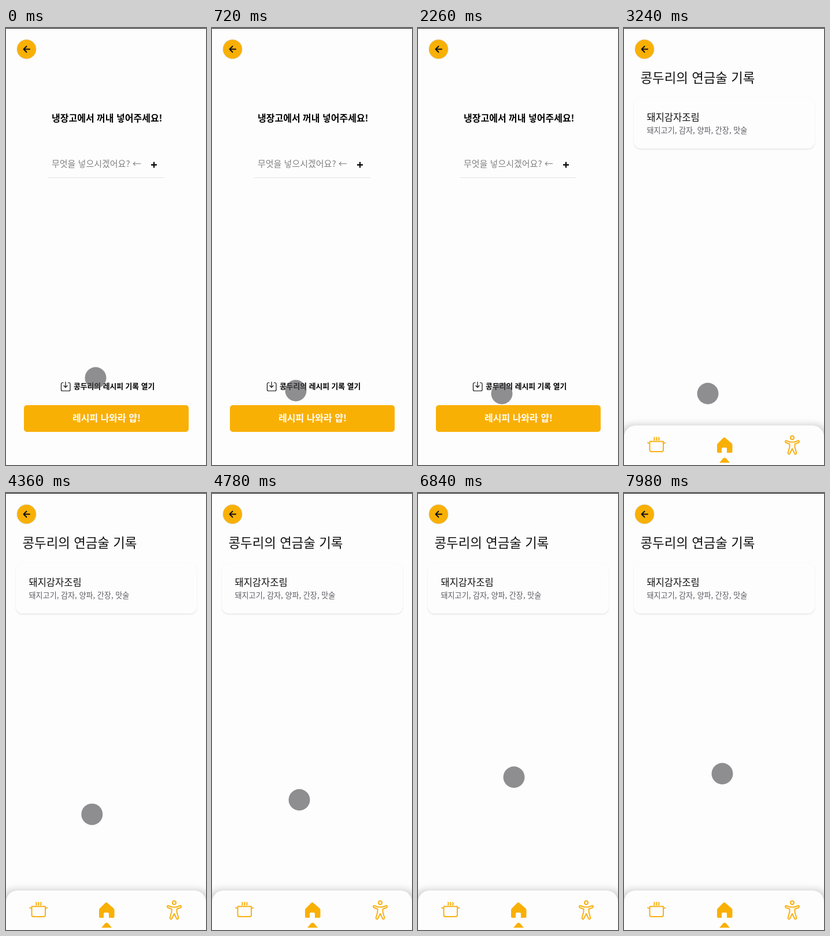
Write an HTML page that moves like this. It is 346 px wide and 752 px high and loops after 8 s.

```html
<!DOCTYPE html>
<html lang="ko">
<head>
<meta charset="utf-8">
<title>레시피 기록</title>
<style>
  html, body { margin: 0; width: 100%; height: 100%; overflow: hidden; background: #fdfdfd; }
  svg { display: block; width: 100vw; height: 100vh; }
  text { font-family: "Noto Sans CJK KR", "Noto Sans CJK", "Noto Sans CJK JP", sans-serif; }
  .bold { font-weight: 700; }
  .light { font-weight: 300; }
  .line { fill: none; stroke: #f9b115; stroke-width: 2; stroke-linecap: round; stroke-linejoin: round; }
  .solid { fill: #f9b005; }
  .ink { fill: none; stroke: #111; }
</style>
</head>
<body>
<svg viewBox="0 0 346 752">
  <defs>
    <filter id="soft" x="-20%" y="-40%" width="140%" height="180%"><feGaussianBlur stdDeviation="6"/></filter>
    <filter id="faint" x="-10%" y="-20%" width="120%" height="140%"><feGaussianBlur stdDeviation="1"/></filter>
  </defs>
  <rect width="346" height="752" fill="#fdfdfd"/>

  <g id="fridge">
    <text class="bold" x="79" y="160.5" font-size="16">냉장고에서 꺼내 넣어주세요!</text>
    <text class="light" x="79" y="239" font-size="15" fill="#808080">무엇을 넣으시겠어요? ←</text>
    <path class="ink" stroke-width="2.4" d="M251 235.5h10M256 230.5v10"/>
    <path d="M73 257.5H274" stroke="#e0e0e0"/>
    <path class="ink" stroke-width="1.2" stroke-linecap="round" stroke-linejoin="round"
      d="M99 610.5h-1.5q-2 0-2 2v10q0 2 2 2h11.5q2 0 2-2v-10q0-2-2-2H107.5M103 609v9.5m-3-3 3 3 3-3"/>
    <text class="bold" x="117" y="620.5" font-size="12.8">콩두리의 레시피 기록 열기</text>
    <rect class="solid" x="31" y="649" width="285" height="46" rx="5"/>
    <text class="bold" x="115" y="676.5" font-size="16" fill="#fdfdfd">레시피 나와라 얍!</text>
  </g>

  <g id="records">
    <text x="28.5" y="94" font-size="22.4" fill="#111">콩두리의 연금술 기록</text>
    <rect x="17" y="122" width="313" height="87" rx="12" fill="#e4e4e6" filter="url(#faint)"/>
    <rect x="17" y="121" width="313" height="86.5" rx="12" fill="#fdfdfd"/>
    <text x="39.5" y="160" font-size="16.5" fill="#111">돼지감자조림</text>
    <text class="light" x="39.5" y="181" font-size="13.1" fill="#5c5c64">돼지고기, 감자, 양파, 간장, 맛술</text>

    <rect x="-6" y="682" width="358" height="90" rx="20" fill="#d2d2d4" filter="url(#soft)"/>
    <rect y="684" width="346" height="90" rx="20" fill="#fdfdfd"/>
    <path class="line" d="M44.5 711.5h23.5v14.5q0 3-3 3h-17.500q-3 0-3-3zM44.500 715.500l-3.500-2M68 715.500l3.500-2M52 704.500q1.500 2 0 4.500M56 704.500q1.500 2 0 4.500M60 704.500q1.500 2 0 4.500"/>
    <path class="solid" d="M173.500 704.500q1 0 2 1l10.500 9q1.500 1.500 1.500 3V729q0 2-2 2H178v-7q0-2-2-2h-5q-2 0-2 2v7h-6q-2 0-2-2V717.500q0-1.500 1.500-3l9-9q1-1 2-1z"/>
    <path class="solid" d="M165 748l6.500-7.500q2.500-2 5 0L183 748z"/>
    <circle class="line" cx="291" cy="705" r="3"/>
    <path class="line" d="M280 710l7.500 2.500h7l7.500-2.500q2 2 0 3.500l-6.500 2.500v5l3 10.500q-1 2.500-3 1.500l-4.500-9-4.500 9q-2 1-3-1.500l3-10.500v-5L280 713.500q-2-1.500 0-3.500z"/>
  </g>

  <path d="M0 .5H346" stroke="#111"/>
  <circle cx="35.5" cy="36.5" r="17" fill="#dcd5c2"/>
  <circle class="solid" cx="35.5" cy="36.5" r="16.3"/>
  <path class="ink" stroke-width="2" stroke-linecap="round" stroke-linejoin="round" d="M41 36.5H30.5m5-5-5 5 5 5"/>
  <circle id="touch" r="18.5" fill="#4f4d51" fill-opacity=".63"/>
</svg>
<script>
  const LOOP = 8000, PAGE_SWITCH = 2860;
  // time, x, y of the finger
  const path = [
    [0, 155, 602], [720, 145, 624], [2260, 145, 629], [3240, 145, 629],
    [4780, 151, 528], [6840, 166, 489], [7980, 170, 483]
  ];
  const byId = id => document.getElementById(id);
  const fridge = byId("fridge"), records = byId("records"), touch = byId("touch");

  const slope = (i, axis) => (path[i + 1][axis] - path[i][axis]) / (path[i + 1][0] - path[i][0]);

  // Harmonic tangents keep the curve smooth without overshoot.
  function tangent(i, axis) {
    if (i === 0) return slope(0, axis);
    if (i === path.length - 1) return slope(i - 1, axis);
    const a = slope(i - 1, axis), b = slope(i, axis);
    return a * b > 0 ? 2 * a * b / (a + b) : 0;
  }

  function position(time, axis) {
    const t = Math.min(time, path[path.length - 1][0]);
    let i = 0;
    while (i < path.length - 2 && t >= path[i + 1][0]) i++;
    const span = path[i + 1][0] - path[i][0], u = (t - path[i][0]) / span;
    const ease = u * u * (3 - 2 * u);
    return path[i][axis] * (1 - ease) + path[i + 1][axis] * ease
      + span * u * (1 - u) * ((1 - u) * tangent(i, axis) - u * tangent(i + 1, axis));
  }

  function draw(now) {
    const time = now % LOOP, opened = time >= PAGE_SWITCH;
    fridge.style.display = opened ? "none" : "";
    records.style.display = opened ? "" : "none";
    touch.setAttribute("cx", position(time, 1));
    touch.setAttribute("cy", position(time, 2));
  }

  const start = performance.now();
  function tick() {
    draw(performance.now() - start);
    requestAnimationFrame(tick);
  }
  tick();
</script>
</body>
</html>
```
